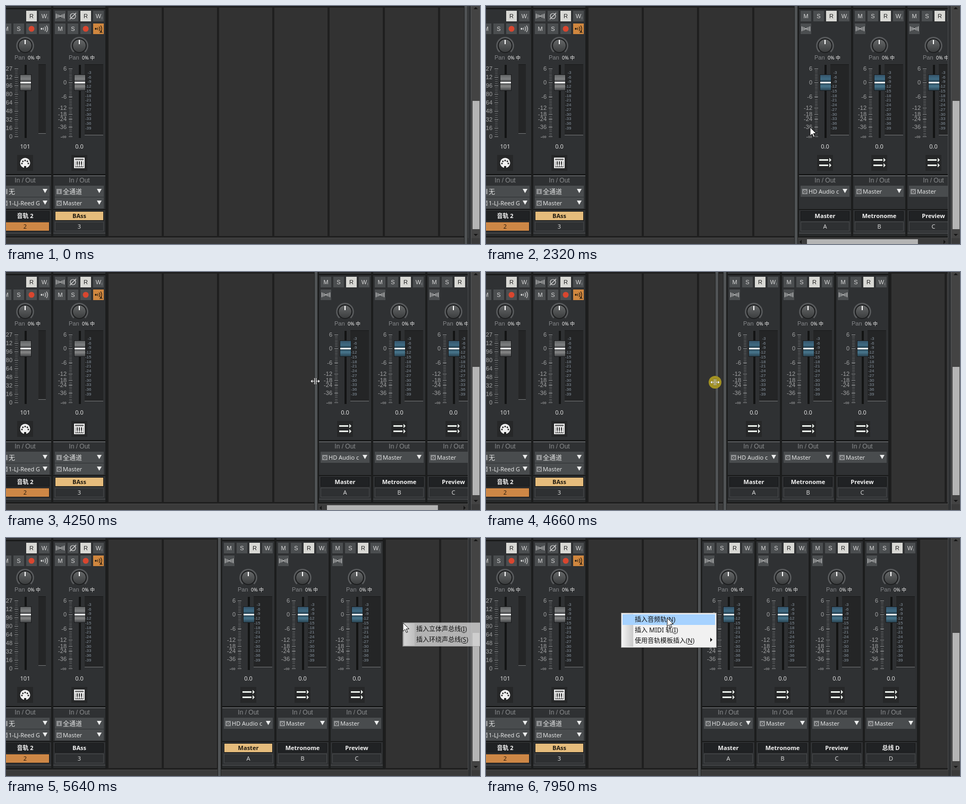
Animation, 892 px wide and 449 px high, one loop 8 s. Source, as an HTML page with a canvas:

```html
<!DOCTYPE html>
<html lang="zh">
<head>
<meta charset="utf-8">
<title>Mixer console</title>
<style>
html, body { margin: 0; width: 100%; height: 100%; overflow: hidden; background: #1f1f1f; }
canvas { display: block; width: 892px; height: 449px; }
</style>
</head>
<body>
<canvas id="stage" width="892" height="449"></canvas>
<script>
const g = document.getElementById('stage').getContext('2d');
const LOOP = 8000, STEP = 70;
const UI = '"Noto Sans", "Open Sans", "Noto Sans CJK SC", "Noto Sans CJK", sans-serif';
const ARIAL = '"Liberation Sans", Arial, sans-serif';
const PITCH = 102, PANE_END = 870;

// Pointer gestures: start, end, goal, optional bend
const entry = [622, -24];
const moves = [
  { from: 200, to: 960, goal: [862, 224], bend: [690, 395] },
  { from: 1230, to: 1910, goal: [580, 224] },
  { from: 2040, to: 2250, goal: [610, 229], bend: [1051, 296] },
  { from: 2320, to: 2600, goal: [581, 218] },
  { from: 2870, to: 3630, goal: [399, 208] },
  { from: 3700, to: 4250, goal: [582, 206], bend: [650, 204] },
  { from: 4450, to: 4737, goal: [398, 208] },
  { from: 5290, to: 5640, goal: [747, 160], bend: [610, 130] },
  { from: 5710, to: 6040, goal: [806, 170] },
  { from: 6440, to: 6790, goal: [778, 205] },
  { from: 6790, to: 7130, goal: [271, 150] },
  { from: 7200, to: 7480, goal: [255, 142], bend: [258, 116] },
  { from: 7810, to: 7950, goal: [341, 151] }
];

function stepped(t) {
  const m = moves.find(m => t >= m.from && t < m.to);
  return m ? Math.min(m.to, m.from + Math.floor((t - m.from + 10) / STEP) * STEP) : t;
}

function pointer(t) {
  let at = entry;
  for (const { from, to, goal, bend } of moves) {
    if (t < from) break;
    const u = Math.min(1, (t - from) / (to - from));
    const k = u * u * (3 - 2 * u);
    at = at.map((a, i) => {
      const c = bend ? bend[i] : (a + goal[i]) / 2;
      return (1 - k) ** 2 * a + 2 * k * (1 - k) * c + k * k * goal[i];
    });
  }
  return at.map(Math.round);
}

// The divider follows the pointer only while it is dragged
const divider = t => pointer(t < 4450 ? Math.min(Math.max(t, 1230), 1910) : Math.min(t, 4737))[0];

function box(x, y, w, h, fill) {
  g.fillStyle = fill;
  g.fillRect(x, y, w, h);
}

function text(s, x, y, size, fill, align = 'center', font = UI, weight = 400) {
  g.font = `${weight} ${size}px ${font}`;
  g.textAlign = align;
  g.fillStyle = fill;
  g.fillText(s, x, y + size * 0.36);
}

function shape(points, fill, stroke, width = 1) {
  g.beginPath();
  points.forEach(([x, y]) => g.lineTo(x, y));
  g.closePath();
  if (fill) { g.fillStyle = fill; g.fill(); }
  if (stroke) { g.strokeStyle = stroke; g.lineWidth = width; g.stroke(); }
}

function arc(x, y, r, from, to, stroke, width) {
  g.beginPath();
  g.arc(x, y, r, from, to);
  g.strokeStyle = stroke;
  g.lineWidth = width;
  g.stroke();
}

function disc(x, y, r, fill) {
  g.beginPath();
  g.arc(x, y, r, 0, 7);
  g.fillStyle = fill;
  g.fill();
}

function shade(y, h, ...colors) {
  const s = g.createLinearGradient(0, y, 0, y + h);
  colors.forEach((c, i) => s.addColorStop(i / (colors.length - 1), c));
  return s;
}

function clipped(x, y, w, h, draw) {
  if (w <= 0) return;
  g.save();
  g.beginPath();
  g.rect(x, y, w, h);
  g.clip();
  draw();
  g.restore();
}

function arrowTip(x, y, dx, dy, r, fill) {
  shape([[x + dx * r, y + dy * r], [x - dy * r, y - dx * r], [x + dy * r, y + dx * r]], fill);
}

function button(kind, x, y) {
  const lit = kind === 'R', ink = kind === 'echoA' ? '#231a10' : '#d8d8d8';
  box(x - 10, y - 10, 20, 20, lit ? '#d9d9d5' : kind === 'echoA' ? '#d0873f' : '#4b4e50');
  if (kind === 'rec') {
    disc(x, y, 5.5, '#d9462f');
  } else if (kind.startsWith('echo')) {
    disc(x - 5, y, 1.8, ink);
    [4, 7.5, 11].forEach(r => arc(x - 5, y, r, -0.6, 0.6, ink, 1.2));
    if (kind === 'echoA') text('A', x + 5, y + 5, 8, ink, 'center', ARIAL, 700);
  } else if (kind === 'width') {
    for (const side of [-1, 1]) {
      for (let i = 0; i < 3; i++) box(x + side * (2.5 + i * 2.5) - 0.5, y - 2.5 - i, 1, 5 + 2 * i, ink);
    }
    box(x - 1, y - 1, 2, 2, ink);
  } else if (kind === 'phase') {
    arc(x, y, 5, 0, 7, ink, 1.2);
    shape([[x - 6, y + 6], [x + 6, y - 6]], null, ink, 1.2);
  } else {
    text(kind, x, y, 11, lit ? '#222' : ink, 'center', ARIAL);
    if (kind === 'W') box(x + 6, y + 1, 1, 5, '#7e8082');
  }
}

function knob(x, y) {
  arc(x, y, 15.5, 2.3, 7.12, '#5a5c5e', 2.5);
  disc(x, y, 13.5, '#191a1b');
  disc(x, y, 12, shade(y - 12, 24, '#666869', '#3b3d3e'));
  box(x - 1, y - 11, 2, 8, '#fff');
}

function fader(x, type) {
  const midi = type === 'midi';
  const ticks = midi ? 32 : 40;
  for (let i = 0; i <= ticks; i++) box(x + 30, Math.round(118 + i * 128 / ticks), 5, 1, '#626466');
  const marks = midi
    ? Array.from({ length: 9 }, (_, i) => [Math.min(127, 128 - i * 16), 118 + i * 16])
    : [['6', 118], ['0', 144], ['-6', 171], ['-12', 192], ['-18', 204], ['-24', 213], ['-36', 228], ['-∞', 246]];
  for (const [s, y] of marks) {
    text(midi && s < 127 && s > 0 ? s : s, x + 25, y, 11, '#a4a5a6', 'right', ARIAL);
    box(x + 29, y, 7, 1, '#8d8f91');
  }
  box(x + 48, 111, 4, 138, '#131414');

  const mx = midi ? x + 74 : x + 59, mw = midi ? 14 : 35, mh = midi ? 130 : 133;
  box(mx, 110, mw, mh, '#242526');
  box(mx, 110, mw, 1, '#181919');
  box(mx, 110 + mh, mw, 1, '#747678');
  for (let i = 0; i < 13 && !midi; i++) {
    text(`-${3 + i * 3}`, x + 71.5, 125 + i * 8.75, 8, '#8794a0', 'right', ARIAL);
  }

  const cap = type === 'bus'
    ? ['#35546a', '#3f6a82', '#315468', '#47748a', '#294453']
    : ['#626465', '#7d7f80', '#56585a', '#858686', '#444648'];
  box(x + 39, 129, 22, 31, '#1b1c1d');
  box(x + 40, 130, 20, 29, shade(130, 29, ...cap));
  box(x + 40, 140, 20, 8, 'rgba(0,0,0,.22)');
  box(x + 40, 143, 20, 3, '#f2f4f4');
}

function icon(x, y, type) {
  box(x - 15, y - 15, 30, 30, '#262728');
  if (type === 'bus') {
    for (const d of [-5, 5]) {
      box(x - 11, y + d - 2, 17, 3, '#e9eee9');
      arrowTip(x + 8, y + d - 0.5, 1, 0, 4, '#e9eee9');
    }
  } else if (type === 'midi') {
    disc(x, y, 9.5, '#f0f0f0');
    for (let i = 0; i < 5; i++) {
      const a = Math.PI * (1 + i / 4);
      disc(x + 6 * Math.cos(a), y + 1 + 5.5 * Math.sin(a), 1.5, '#222');
    }
    box(x - 2, y + 6, 4, 4, '#222');
  } else {
    box(x - 10, y - 10, 20, 20, '#ededed');
    box(x - 8, y - 8, 16, 3, '#777');
    box(x - 8, y - 3, 16, 11, '#333');
    for (let i = 0; i < 4; i++) box(x - 7.5 + i * 4, y - 3, 3, 10, '#ededed');
    for (let i = 0; i < 3; i++) box(x - 5 + i * 4, y - 3, 2, 6, '#333');
  }
}

function dropdown(x, y, tag, label) {
  box(x + 3, y, 92, 21, '#494c4e');
  box(x + 6, y + 6, 10, 10, '#8e9092');
  text(tag, x + 11, y + 11, 8, '#2b2c2d', 'center', ARIAL, 700);
  clipped(x + 18, y, 58, 21, () =>
    text(label, x + 18, y + 11.5, /[a-z]/i.test(label) ? 11 : 12, '#e4e5e5', 'left'));
  shape([[x + 82, y + 6], [x + 91, y + 6], [x + 86.5, y + 14]], '#eceded');
}

function strip(x, s, selected) {
  const mid = x + 49, orange = s.type === 'midi';
  box(x - 4, 0, 106, 437, '#1c1d1d');
  box(x, 0, 98, 434, '#2f3133');
  box(x, 4, 98, 2, '#141515');
  s.rows.forEach((row, r) => row.forEach((kind, i) => kind && button(kind, x + 13 + i * 24, 19 + r * 24)));

  knob(mid, 75);
  text('Pan', mid - 20, 97, 11, '#85878a', 'left', ARIAL);
  text('0% 中', mid + 5, 97.5, 9, '#eee', 'left');
  fader(x, s.type);
  text(orange ? '101' : '0.0', mid, 265, 11, '#dedede');
  icon(mid, 296, s.type);

  box(x, 317, 98, 2, '#151616');
  box(x, 320, 98, 1, '#77797b');
  text('In / Out', mid, 329, 12, '#8b8d8f', 'center', ARIAL);
  s.io.forEach(([tag, label], i) => dropdown(x, 339 + i * 22, tag, label));

  box(x, 383, 98, 2, '#191a1a');
  box(x + 3, 387, 92, 18, '#18191a');
  box(x + 4, 388, 90, 16, selected ? '#e5bc7c' : '#202224');
  text(s.name, mid, 396.5, 11, selected ? '#201a10' : '#f3f3f3', 'center', UI, 700);
  box(x + 3, 407, 92, 18, orange ? '#191a1a' : '#46484a');
  box(x + 4, 408, 90, 16, orange ? '#cd8746' : '#2e3032');
  text(s.id, mid, 416.5, 11, orange ? '#2b1c0e' : '#d8d8d8');
  box(x, 428, 98, 1, '#525456');
  box(x, 430, 98, 4, '#292b2c');
}

function pane(x, end, strips, picked) {
  strips.forEach((s, i) => strip(x + i * PITCH, s, s.name === picked));
  for (let lx = x + strips.length * PITCH + 2; lx < end; lx += 104) box(lx, 3, 100, 431, '#323232');
}

const tracks = [
  { type: 'midi', name: '音轨 2', id: '2', rows: [['', '', 'R', 'W'], ['M', 'S', 'rec', 'echo']],
    io: [['I', '无'], ['O', '1-LJ-Reed G']] },
  { type: 'synth', name: 'BAss', id: '3', rows: [['width', 'phase', 'R', 'W'], ['M', 'S', 'rec', 'echoA']],
    io: [['I', '全通道'], ['O', 'Master']] }
];
const buses = ['Master', 'Metronome', 'Preview', '总线 D'].map((name, i) => ({
  type: 'bus', name, id: 'ABCD'[i], rows: [['M', 'S', 'R', 'W'], ['width']],
  io: [['O', i ? 'Master' : 'HD Audio c']]
}));

function bar(x) {
  box(x, 0, 7, 449, '#222323');
  box(x + 1, 0, 5, 449, '#505355');
}

function hScroll(x) {
  const w = PANE_END - x, len = w - 34;
  if (len < 20) return;
  box(x, 439, w, 10, '#3c3c3c');
  arrowTip(x + 8, 445, -1, 0, 4, '#151515');
  arrowTip(PANE_END - 9, 445, 1, 0, 4, '#151515');
  box(x + 18, 440, len * w / 340, 9, '#b4b4b4');
}

function vScroll() {
  box(870, 0, 6, 449, '#2f3133');
  box(869, 0, 1, 438, '#4b4d4f');
  box(875, 0, 1, 449, '#555759');
  box(876, 0, 16, 438, '#434343');
  arrowTip(884, 6, 0, -1, 4, '#151515');
  box(878, 179, 13, 242, '#b4b4b4');
  arrowTip(884, 430, 0, 1, 4, '#151515');
}

function menu(x, y, w, items, age, cx, cy) {
  const h = items.length * 20 + 6, fading = age < STEP;
  const hot = !fading && cx > x + 3 ? Math.floor((cy - y - 3) / 20) : -1;
  g.globalAlpha = fading ? 0.55 : 1;
  box(x, y, w, h, '#979797');
  box(x + 1, y + 1, w - 2, h - 2, '#f1f1f1');
  const side = g.createLinearGradient(x + 3, 0, x + 23, 0);
  side.addColorStop(0, '#f1f1f1');
  side.addColorStop(1, '#c9c9c9');
  box(x + 3, y + 2, 20, h - 4, side);
  g.globalAlpha = 1;
  items.forEach(([label, key, sub], i) => {
    const mid = y + 13 + i * 20;
    if (i === hot) box(x + 3, mid - 10, w - 6, 20, '#a6d2ff');
    text(`${label}(${key})`, x + 26, mid, 12, '#111', 'left');
    const kx = x + 26 + g.measureText(label + '(').width;
    box(kx, mid + 6, g.measureText(key).width, 1, '#111');
    if (sub) arrowTip(x + w - 12, mid - 2, 1, 0, 4, '#111');
  });
}

function arrowCursor(x, y) {
  shape([[0, 0], [0, 16], [3.8, 12.4], [6.4, 18.4], [8.8, 17.4], [6.2, 11.6], [11.4, 11.4]]
    .map(([a, b]) => [x + a, y + b]), '#fff', '#111', 1);
}

function resizeCursor(x, y) {
  for (const [ink, pad] of [['rgba(17,17,17,.5)', 0.5], ['#fff', 0]]) {
    for (const d of [-1, 1]) {
      box(x + d * 1.5 - 0.5 - pad, y - 6 - pad, 1 + 2 * pad, 12 + 2 * pad, ink);
      box(d < 0 ? x - 6 : x + 2, y - 0.5 - pad, 4, 1 + 2 * pad, ink);
      arrowTip(x + d * 5.5, y, d, 0, 3 + pad, ink);
    }
  }
}

function draw(now) {
  const t = stepped(now);
  const within = (a, b) => t >= a && t < b;
  const div = divider(t);
  const body = divider(t - 19); // panes trail the dragged bar
  const [cx, cy] = pointer(t);
  const picked = within(5560, 7470) ? 'Master' : 'BAss';
  const shown = buses.slice(0, t < 6435 ? 3 : 4);

  box(0, 0, 892, 449, '#1f1f1f');
  clipped(0, 0, body, 437, () => pane(-13, body, tracks, picked));
  box(0, 437, 892, 12, '#3a3a3a');
  box(0, 437, 870, 1, '#4a4a4a');
  clipped(body + 6, 0, PANE_END - body - 6, 437, () => pane(body + 9, PANE_END, shown, picked));
  if (PANE_END - body < shown.length * PITCH) hScroll(body + 6);
  bar(body);
  bar(div);
  vScroll();

  if (within(5630, 6435)) {
    menu(746, 159, 176, [['插入立体声总线', 'I'], ['插入环绕声总线', 'S']], t - 5630, cx, cy);
  }
  if (t >= 7535) {
    menu(254, 141, 180, [['插入音频轨', 'N'], ['插入 MIDI 轨', 'I'], ['使用音轨模板插入', 'N', true]],
      t - 7535, cx, cy);
  }

  const dragging = within(1230, 2035) || within(4450, 5285);
  if (dragging || within(6365, 6435)) disc(cx, cy, 12, '#a39222');
  if (t < 200) return;
  if (dragging || (cx >= div - 1 && cx <= div + 6)) resizeCursor(cx, cy);
  else arrowCursor(cx, cy);
}

const start = performance.now();
function tick() {
  draw((performance.now() - start) % LOOP);
  requestAnimationFrame(tick);
}
tick();
</script>
</body>
</html>
```
